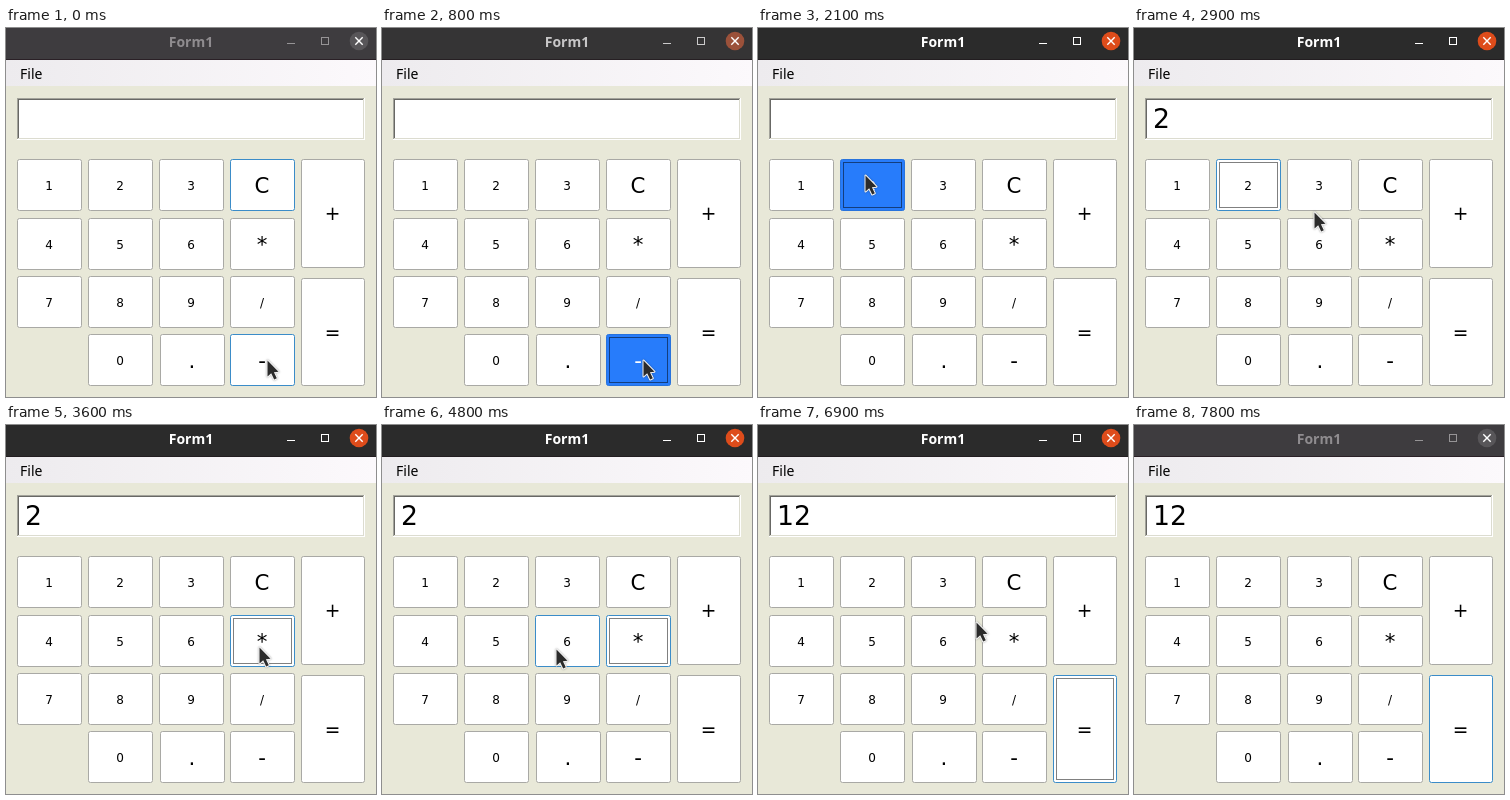
Write an HTML page with a canvas that moves like this. It is 370 px wide and 369 px high and loops after 8 s.

```html
<!DOCTYPE html>
<html lang="en">
<head>
<meta charset="utf-8">
<title>Form1</title>
<style>
html, body { margin: 0; width: 100%; height: 100%; overflow: hidden; background: #e8e8d8; }
canvas { display: block; }
</style>
</head>
<body>
<canvas id="stage" width="370" height="369"></canvas>
<script>
const ctx = document.getElementById('stage').getContext('2d');
const LOOP = 8000, STEP = 100;
const BLUE = '#3b8cc8', PRESSED = '#277cfb';
const SANS = '"DejaVu Sans", sans-serif';
const BIG = 64 / 3, MID = 56 / 3, SMALL = 12;

// label, x, y, width, height, font size
const buttons = [];
const cols = [11, 82, 153, 224], rows = [131, 190, 248, 306];
['123C', '456*', '789/', ' 0.-'].forEach((line, r) => {
  [...line].forEach((label, c) => {
    if (label === ' ') return;
    const x = cols[c] + (label === '.' ? 1 : 0);
    buttons.push([label, x, rows[r], 65, 52, 'C*.-'.includes(label) ? BIG : SMALL]);
  });
});
buttons.push(['+', 295, 131, 64, 109, MID], ['=', 295, 250, 64, 108, MID]);

// Each move: start time, then one pointer position per step.
const moves = [
  [0, [261, 332]],
  [1300, [253, 326], [240, 310], [211, 274], [175, 228], [140, 183], [117, 157], [107, 147]],
  [2800, [127, 156], [180, 184], [234, 212], [253, 222]],
  [4300, [238, 237], [212, 256], [178, 259], [151, 246], [164, 231], [174, 224]],
  [5400, [187, 229], [219, 244], [253, 261], [300, 294], [323, 311]],
  [6900, [218, 197], [172, 139], [126, 80], [80, 22], null]
];

// The button the pointer rests on, until it leaves.
const hovers = [['-', 0, 1300], ['2', 1900, 2800], ['*', 3100, 4300], ['6', 4800, 5400], ['=', 5800, 6900]];
const presses = [['-', 800, 1000], ['2', 2100, 2300], ['*', 3400, 3600], ['6', 5000, 5200], ['=', 6000, 6200]];
const focuses = [['C', 0], ['-', 800], ['2', 2100], ['*', 3400], ['6', 5000], ['=', 6200]];
const readings = [['', 0], ['2', 2300], ['6', 5200], ['12', 6200]];

const latest = (list, t) => list.filter(e => e[1] <= t).pop()[0];
const within = (list, t) => (list.find(e => t >= e[1] && t < e[2]) || [''])[0];

function pointerAt(t) {
  const [start, ...points] = moves.filter(m => m[0] <= t).pop();
  return points[Math.min(Math.floor((t - start) / STEP), points.length - 1)];
}

function activity(t) {
  if (t < 800 || t >= 7800) return 0;
  return t < 900 ? 0.5 : 1;
}

function mix(a, b, k) {
  return `rgb(${a.map((v, i) => Math.round(v + (b[i] - v) * k)).join()})`;
}

function rect(x, y, w, h, color) {
  ctx.fillStyle = color;
  ctx.fillRect(x, y, w, h);
}

function text(str, x, y, font, color, align = 'center') {
  ctx.font = font;
  ctx.textAlign = align;
  ctx.fillStyle = color;
  ctx.fillText(str, x, y);
}

function line(color, width, ...points) {
  ctx.strokeStyle = color;
  ctx.lineWidth = width;
  ctx.beginPath();
  points.forEach(([x, y], i) => i ? ctx.lineTo(x, y) : ctx.moveTo(x, y));
  ctx.stroke();
}

function drawTitle(k) {
  rect(0, 0, 370, 32, mix([62, 60, 63], [43, 43, 43], k));
  rect(0, 31, 370, 1, mix([42, 32, 38], [34, 29, 32], k));
  text('Form1', 185, 19, 'bold 14px "Noto Sans", "Open Sans", sans-serif', mix([143, 140, 143], [255, 255, 255], k));
  const icon = mix([150, 148, 150], [255, 255, 255], k);
  rect(281, 15, 8, 1, icon);
  ctx.strokeStyle = icon;
  ctx.lineWidth = 1;
  ctx.strokeRect(315.5, 9.5, 7, 7);
  ctx.fillStyle = mix([88, 86, 89], [222, 76, 27], k);
  ctx.beginPath();
  ctx.arc(353, 13, 9.3, 0, Math.PI * 2);
  ctx.fill();
  line('#fff', 1.4, [349.3, 9.3], [356.7, 16.7]);
  line('#fff', 1.4, [356.7, 9.3], [349.3, 16.7]);
}

function drawMenu() {
  const g = ctx.createLinearGradient(0, 0, 370, 0);
  g.addColorStop(0, '#edebee');
  g.addColorStop(1, '#fcf9fc');
  rect(0, 32, 370, 26, g);
  text('File', 14, 51, '14px "Noto Sans", "Open Sans", sans-serif', '#000', 'left');
}

function drawDisplay(value) {
  rect(11, 70, 348, 42, '#fff');
  rect(11, 70, 347, 1, '#a3a39b');
  rect(11, 70, 1, 41, '#a3a39b');
  rect(12, 71, 345, 1, '#686865');
  rect(12, 71, 1, 39, '#686865');
  rect(12, 110, 346, 1, '#dcdcd0');
  rect(357, 71, 1, 40, '#dcdcd0');
  text(value, 19, 100, `${80 / 3}px ${SANS}`, '#000', 'left');
}

function drawDots(x, y, w, h) {
  ctx.strokeStyle = '#000';
  ctx.lineWidth = 1;
  ctx.setLineDash([1, 1]);
  ctx.strokeRect(x + 0.5, y + 0.5, w - 1, h - 1);
  ctx.setLineDash([]);
}

function drawButton([label, x, y, w, h, size], s) {
  const down = label === s.pressed, focused = label === s.focus;
  ctx.beginPath();
  ctx.roundRect(x + 0.5, y + 0.5, w - 1, h - 1, 2);
  ctx.fillStyle = down ? PRESSED : '#fff';
  ctx.fill();
  ctx.strokeStyle = down ? '#2873dc' : focused || label === s.hover ? BLUE : '#a9a9a5';
  ctx.lineWidth = 1;
  ctx.stroke();
  const base = Math.round(y + h / 2 + size * 0.346 + 0.4);
  text(label, x + w / 2 - 0.5, base, `${size}px ${SANS}`, down ? '#fff' : '#000');
  if (focused && s.active) drawDots(x + 3, y + 3, w - 6, h - 6);
}

function drawPointer([x, y]) {
  ctx.save();
  ctx.translate(x + 0.5, y + 0.5);
  ctx.beginPath();
  [[0, 0], [0, 16], [3.7, 12.7], [6.7, 19], [9.3, 17.8], [6.4, 11.7], [11, 11.2]]
    .forEach(p => ctx.lineTo(...p));
  ctx.closePath();
  ctx.lineJoin = 'round';
  ctx.lineWidth = 2;
  ctx.strokeStyle = '#f4f4f4';
  ctx.shadowColor = 'rgba(0,0,0,0.35)';
  ctx.shadowBlur = 2;
  ctx.stroke();
  ctx.shadowColor = 'transparent';
  ctx.fillStyle = '#2b2b2b';
  ctx.fill();
  ctx.restore();
}

function draw(t) {
  const k = activity(t);
  const state = {
    active: k > 0,
    focus: latest(focuses, t),
    hover: within(hovers, t),
    pressed: within(presses, t)
  };
  rect(0, 0, 370, 369, '#e8e8d8');
  drawTitle(k);
  drawMenu();
  drawDisplay(latest(readings, t));
  buttons.forEach(b => drawButton(b, state));
  const pointer = pointerAt(t);
  if (pointer) drawPointer(pointer);
}

const begin = performance.now();
function tick() {
  draw((performance.now() - begin) % LOOP);
  requestAnimationFrame(tick);
}
tick();
</script>
</body>
</html>
```
